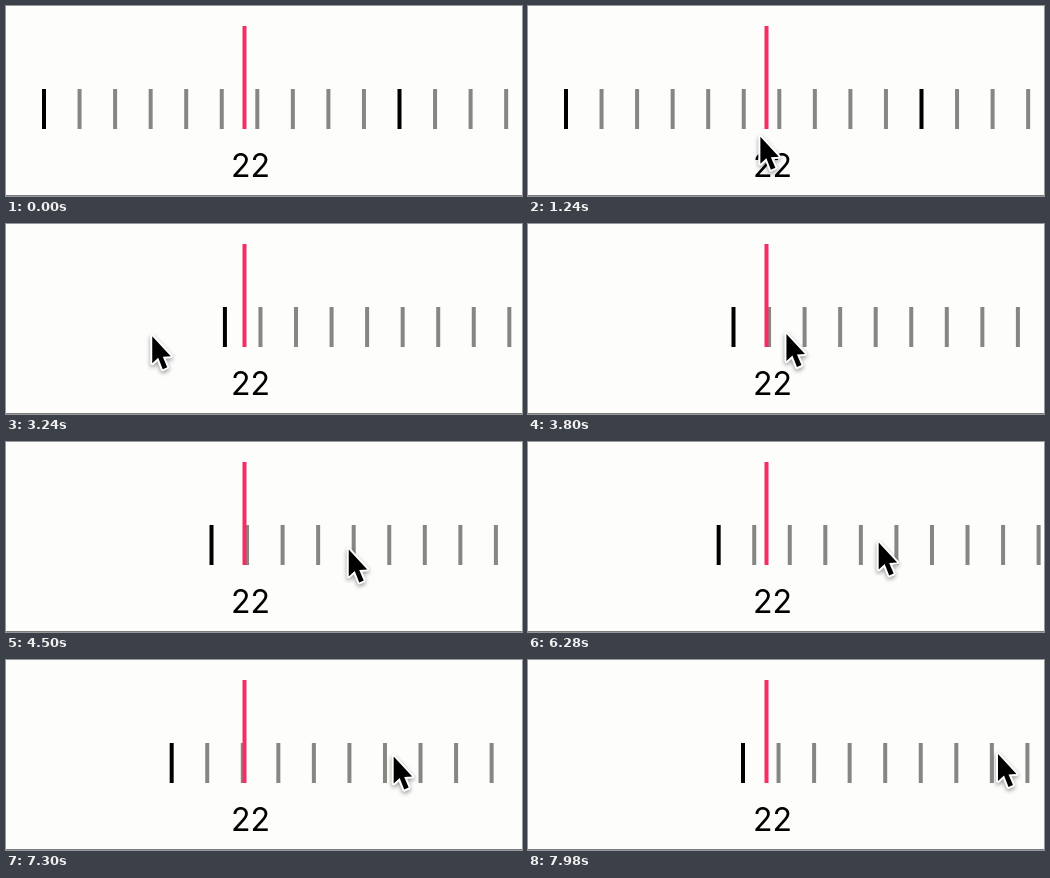
These frames come from a looping animation (516 px wide and 190 px high, 8 s). An HTML page with a canvas:

```html
<!DOCTYPE html>
<html lang="en">
<head>
<meta charset="utf-8">
<title>Ruler picker</title>
<style>
  html, body { margin: 0; width: 100%; height: 100%; overflow: hidden; background: #fdfdfb; }
  canvas { display: block; }
</style>
</head>
<body>
<canvas id="stage" width="516" height="190"></canvas>
<script>
const W = 516, H = 190, LOOP = 8000;
const STEP = 35.55, NEEDLE = 238.5;
const HOME = 38, LIMIT = 215, BOUNCE = 219, SETTLED = 205.5;
const ENTER = 500, ARRIVE = 2260, PULL = 2460, RELEASE = 2860, COAST = 3240, GRAB = 5100, TURN = 6590;
const ctx = document.getElementById('stage').getContext('2d');

const lerp = (a, b, u) => a + (b - a) * u;
const easeOut = (u, power = 2) => 1 - Math.pow(1 - Math.min(1, Math.max(0, u)), power);

// Pointer stops; power 1 moves evenly, more slows down on arrival
const stops = [
  { at: ENTER, x: 290 },
  { at: ARRIVE, x: 218.5, power: 3 },
  { at: PULL, x: 218.5, power: 1 },
  { at: RELEASE, x: 399.5, power: 2 },
  { at: COAST, x: 146, power: 1 },
  { at: GRAB, x: 365.5, power: 2 },
  { at: 5620, x: 166, power: 1 },
  { at: TURN, x: 437, power: 1 },
  { at: 6865, x: 248, power: 1 },
  { at: 7980, x: 470, power: 2 }
];

function pointerX(t) {
  const next = stops.findIndex((stop, i) => i > 0 && t < stop.at);
  if (next < 0) return stops[stops.length - 1].x;
  const a = stops[next - 1], b = stops[next];
  return lerp(a.x, b.x, easeOut((t - a.at) / (b.at - a.at), b.power));
}

// Comes in from below, then drifts slowly upwards
function pointerY(t) {
  if (t < ARRIVE) return lerp(192, 116, easeOut((t - ENTER) / (ARRIVE - ENTER), 3));
  return lerp(116, 94, (t - ARRIVE) / (7980 - ARRIVE));
}

// The ruler follows the pointer while held, up to its limit
function rulerStart(t) {
  const x = pointerX(t);
  if (t < PULL) return HOME;
  if (t < RELEASE) return HOME + x - 218.5;
  if (t < GRAB) return lerp(BOUNCE, SETTLED, easeOut((t - COAST) / 320));
  const hold = t < TURN ? 365.5 - SETTLED : 437 - LIMIT;
  return Math.min(LIMIT, x - hold);
}

function bar(x, top, bottom, color) {
  ctx.fillStyle = color;
  ctx.fillRect(x - 2, top, 4, bottom - top);
}

function drawPointer(x, y) {
  ctx.save();
  ctx.translate(x, y);
  const arrow = new Path2D('M0 0V27L6 21.5L10.5 33L15 31L10.5 20.5L18.5 20Z');
  ctx.lineJoin = 'round';
  ctx.lineWidth = 4;
  ctx.strokeStyle = '#fff';
  ctx.shadowColor = 'rgba(0, 0, 0, 0.4)';
  ctx.shadowBlur = 4;
  ctx.shadowOffsetY = 2;
  ctx.stroke(arrow);
  ctx.shadowColor = 'transparent';
  ctx.fillStyle = '#000';
  ctx.fill(arrow);
  ctx.restore();
}

function draw(t) {
  ctx.fillStyle = '#fdfdfb';
  ctx.fillRect(0, 0, W, H);

  const start = rulerStart(t);
  for (let i = 0; start + i * STEP < W + 2; i++) {
    bar(start + i * STEP, 83, 123, i % 10 ? '#868682' : '#000');
  }
  bar(NEEDLE, 20, 123, '#f62c62');

  ctx.fillStyle = '#000';
  ctx.font = '32px Inter, Roboto, sans-serif';
  ctx.textAlign = 'center';
  ctx.fillText('22', 244.5, 171);

  ctx.fillStyle = '#7c7c80';
  ctx.fillRect(0, H - 1, W, 1);

  if (t >= ENTER) drawPointer(pointerX(t), pointerY(t));
}

function frame() {
  draw(performance.now() % LOOP);
  requestAnimationFrame(frame);
}
frame();
</script>
</body>
</html>
```
